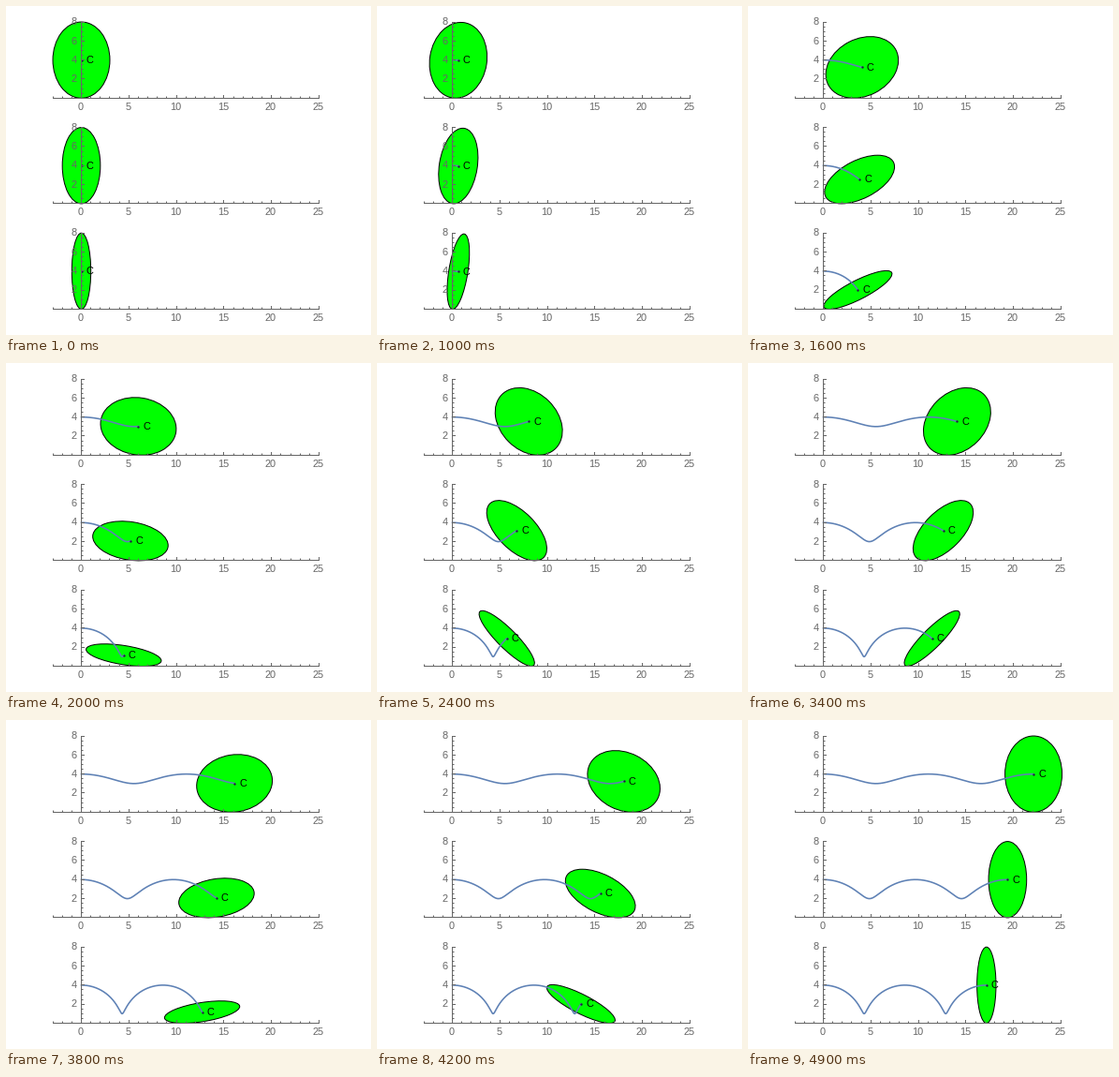
A matplotlib script that plays this animation: 390 by 351 pixels, repeating every 9.9 s.

```python
import numpy as np
import matplotlib.pyplot as plt
from matplotlib.animation import FuncAnimation
from matplotlib.patches import Ellipse

W, H, DPI = 390, 351, 100
UNIT = 10.16                      # pixels per axis unit
X0 = 80.5                         # pixel column of x = 0
BASES = (98.3, 210.9, 323.5)      # pixel rows of y = 0
WIDTHS = (3, 2, 1)                # horizontal semi-axes
TALL = 4                          # vertical semi-axis
MAJOR, MINOR = 3.5, 2             # tick lengths
STEPS, HOLD = 40, 9
FRAMES, INTERVAL = 99, 100
GREY, BLUE, GREEN = "#666666", "#5e81b5", "#00ff00"
FINE = 20                         # path samples per step

plt.rcParams["font.family"] = "Liberation Sans"


def px(size):
    return size * 72 / DPI


def mid(v):
    """Centre of the pixel that holds v."""
    return np.floor(v) + 0.5


def roll(a, b):
    """Centre of an ellipse rolling on a line, for one full turn."""
    turn = np.linspace(0, 2 * np.pi, STEPS * FINE + 1)
    t = np.unwrap(np.arctan2(a * np.sin(turn), b * np.cos(turn)))
    u = np.linspace(0, 2 * np.pi, 8001)
    speed = np.hypot(a * np.cos(u), b * np.sin(u))
    steps = (speed[1:] + speed[:-1]) / 2 * (u[1] - u[0])
    arc = np.concatenate(([0], np.cumsum(steps)))
    contact = a * np.sin(t) * np.cos(turn) - b * np.cos(t) * np.sin(turn)
    x = np.interp(t, u, arc) - contact
    y = np.hypot(a * np.sin(turn), b * np.cos(turn))
    return x, y


fig = plt.figure(figsize=(W / DPI, H / DPI), dpi=DPI, facecolor="white")
ax = fig.add_axes([0, 0, 1, 1])
ax.set_xlim(0, W)
ax.set_ylim(H, 0)
ax.axis("off")


def rule(xs, ys):
    ax.plot(xs, ys, color=GREY, lw=px(1), zorder=5, snap=False,
            solid_capstyle="butt")


def label(x, y, text, **kw):
    style = dict(fontsize=px(11), color=GREY, va="baseline", zorder=6)
    style.update(kw)
    return ax.text(x, y, text, **style)


def draw_axes(base):
    row = mid(base)
    rule([mid(X0 - 3 * UNIT) - 0.5, mid(X0 + 25 * UNIT) + 0.5], [row, row])
    rule([X0, X0], [row, mid(base - 8 * UNIT) - 0.5])
    for i in range(-3, 26):
        x = X0 + i * UNIT
        major = i % 5 == 0
        rule([mid(x)] * 2, [row, row - (MAJOR if major else MINOR)])
        if major:
            label(x - 1, base + 12.3, str(i), ha="center")
    for i in range(1, 17):
        y = base - i * UNIT / 2
        major = i % 4 == 0
        rule([X0, X0 + (MAJOR if major else MINOR)], [mid(y)] * 2)
        if major:
            label(X0 - 4.8, y + 3.2, str(i // 2), ha="right")


class Roller:
    def __init__(self, a, base):
        x, y = roll(a, TALL)
        self.x, self.y = X0 + x * UNIT, base - y * UNIT
        self.body = Ellipse((0, 0), 2 * a * UNIT, 2 * TALL * UNIT,
                            fc=GREEN, ec="black", lw=px(1), zorder=2)
        ax.add_patch(self.body)
        self.path, = ax.plot([], [], color=BLUE, lw=px(1.6), zorder=3)
        self.dot, = ax.plot([], [], "o", color="#202040", ms=px(2.4),
                            mew=0, zorder=4)
        self.name = label(0, 0, "C", color="black", ha="center")
        draw_axes(base)

    def place(self, step):
        n = step * FINE
        x, y = self.x[n], self.y[n]
        self.body.set_center((x, y))
        self.body.set_angle(360 * step / STEPS)
        self.path.set_data(self.x[:n + 1], self.y[:n + 1])
        self.dot.set_data([x], [y])
        self.name.set_position((x + 9, y + 3.4))


rollers = [Roller(a, base) for a, base in zip(WIDTHS, BASES)]


def update(frame):
    step = min(max(frame - HOLD, 0), STEPS)
    for r in rollers:
        r.place(step)
    return []


anim = FuncAnimation(fig, update, frames=FRAMES, interval=INTERVAL,
                     init_func=lambda: update(0), repeat=True,
                     repeat_delay=0, blit=False)
plt.show()
```
